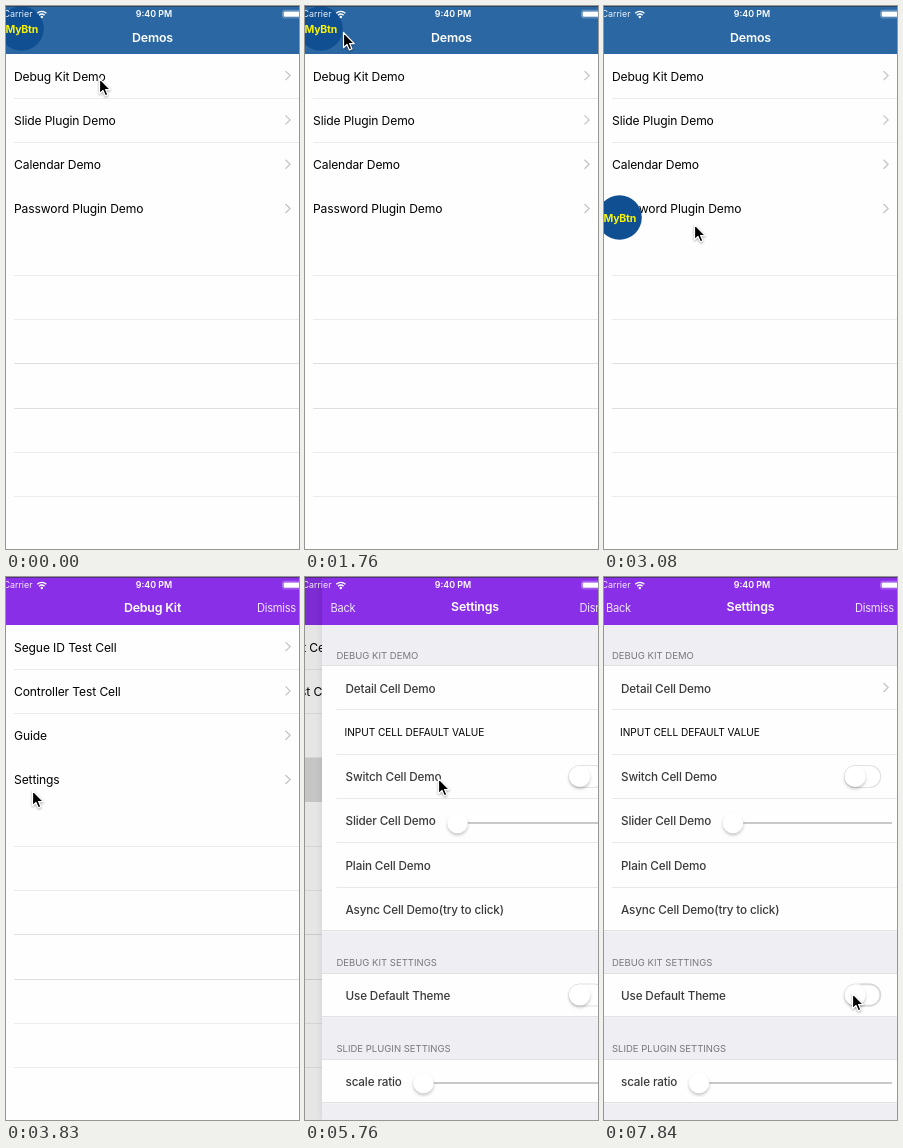
Write an HTML page that moves like this. It is 293 px wide and 543 px high and loops after 7990 ms.

```html
<!DOCTYPE html>
<html lang="en">
<head>
<meta charset="utf-8">
<title>Demos</title>
<style>
  html, body { margin: 0; width: 100%; height: 100%; overflow: hidden; background: #fefefe; }
  svg { display: block; width: 293px; height: 543px; font-family: Inter, "Liberation Sans", sans-serif; }
  .row { font-size: 12.1px; letter-spacing: -.12px; }
  .cell { font-size: 11.7px; font-weight: 500; letter-spacing: -.14px; fill: #3a3a3a; }
  .input { font-size: 10.1px; letter-spacing: -.03px; }
  .label { font-size: 9.5px; fill: #77777c; }
  .title { font-size: 12.4px; font-weight: 600; letter-spacing: -.2px; fill: #fff; text-anchor: middle; }
  .nav { font-size: 11.1px; letter-spacing: -.25px; fill: #f1e4ff; }
  .status { font-size: 8.9px; fill: #fff; }
  .chevron { fill: none; stroke: #c4c4c9; stroke-width: 1.3; }
  .lift { filter: drop-shadow(0 2px 1.6px rgba(0, 0, 0, .22)); }
  #settings { filter: drop-shadow(0 0 3px rgba(0, 0, 0, .1)); }
  #cursor { filter: drop-shadow(0 1px 1px rgba(0, 0, 0, .35)); }
</style>
</head>
<body>
<svg viewBox="0 0 293 543">
  <defs>
    <linearGradient id="beach" x1="0" y1="0" x2="0" y2="1">
      <stop offset="0" stop-color="#1673b4"/>
      <stop offset=".28" stop-color="#1b79b9"/>
      <stop offset=".37" stop-color="#3c89c4"/>
      <stop offset=".44" stop-color="#8db8da"/>
      <stop offset=".5" stop-color="#c6d6e2"/>
      <stop offset=".56" stop-color="#dddfe2"/>
      <stop offset=".65" stop-color="#e5e1df"/>
      <stop offset="1" stop-color="#e8e2df"/>
    </linearGradient>
    <filter id="soft" x="-50%" y="-50%" width="200%" height="200%"><feGaussianBlur stdDeviation="9"/></filter>
    <clipPath id="sheetClip"><path d="M0 -200H293V0H0Z"/></clipPath>
  </defs>

  <g id="demos"></g>
  <g id="debug"></g>
  <rect id="dim" width="293" height="543"/>
  <g id="settings"></g>

  <g id="button">
    <circle r="22.3" fill="#114f93"/>
    <text x=".3" y="4" text-anchor="middle" font-size="10.5" font-weight="700" letter-spacing="-.2" fill="#f6f20c">MyBtn</text>
  </g>

  <g class="status">
    <text x="-2.5" y="11.2" opacity=".9">Carrier</text>
    <text x="148" y="11.2" text-anchor="middle" font-weight="600">9:40 PM</text>
    <path d="M31.2 7.2a6.8 6.8 0 0 1 9.2 0M33 9.2a4.2 4.2 0 0 1 5.6 0" fill="none" stroke="#fff" stroke-width="1.3"/>
    <circle cx="35.8" cy="11" r="1.2"/>
    <rect x="276.5" y="4.3" width="22" height="7.6" rx="2" fill="none" stroke="#fff" stroke-width=".8" opacity=".4"/>
    <rect x="277.6" y="5.4" width="20" height="5.4" rx="1.2"/>
  </g>

  <g id="sheet" clip-path="url(#sheetClip)">
    <rect y="-170" width="293" height="170" fill="url(#beach)"/>
    <g filter="url(#soft)">
      <ellipse cx="68" cy="-80" rx="28" ry="10" fill="#b9c3ca" opacity=".7"/>
      <ellipse cx="120" cy="-122" rx="35" ry="14" fill="#4a93c9" opacity=".6"/>
      <ellipse cx="200" cy="-130" rx="45" ry="14" fill="#2f80d2" opacity=".8"/>
      <ellipse cx="75" cy="-27" rx="42" ry="9" fill="#e4d8dd"/>
      <path d="M205 8L300 -42V8Z" fill="#ffd3a9"/>
    </g>
    <circle cx="140" cy="-7.5" r="2.8" fill="#d0d2d7"/>
    <circle cx="153" cy="-7.5" r="2.8" fill="#fff"/>
  </g>

  <rect width="293" height="1" fill="#282828" opacity=".5"/>
  <path id="cursor" d="M0 0V15.2L3.5 12L5.9 17.4L8.4 16.3L6.1 11.1H10.8Z" fill="#000" stroke="#fff" stroke-width="1.2" stroke-linejoin="round"/>
</svg>

<script>
const LOOP = 7990, WIDTH = 306;
const el = id => document.getElementById(id);

const rect = (x, y, w, h, fill) => `<rect x="${x}" y="${y}" width="${w}" height="${h}" fill="${fill}"/>`;
const text = (kind, x, y, s) => `<text class="${kind}" x="${x}" y="${y}">${s}</text>`;
const chevron = y => `<path class="chevron" d="M279.5 ${y - 4.5}l4.6 4.5l-4.6 4.5"/>`;
const line = (y, color, x = 8) => rect(x, y, 299.5 - x, 1, color);
const header = (color, title, y) => rect(-6.5, 0, WIDTH, 48, color) + text('title', 146.5, y, title);
const dismiss = text('nav', 251, 35, 'Dismiss');

// Shared layout of the two list pages.
function listPage(bar, rows) {
  let s = rect(-6.5, 0, WIDTH, 543, '#fefefe');
  s += '<rect class="press" x="-6.5" y="180.5" width="306" height="44.5" fill="#d9d9d9" visibility="hidden"/>';
  for (const y of [92, 136, 269, 313, 357, 402, 446, 490])
    s += line(y, y === 357 || y === 402 ? '#dfdfe0' : '#ebebec');
  rows.forEach((name, i) => {
    const y = 70 + i * 44.3;
    s += text('row', 8, y + 4.5, name) + chevron(y - .4);
  });
  return s + bar;
}

const knob = (x, y, r) => `<circle class="lift" cx="${x}" cy="${y}" r="${r}" fill="#fff"/>`;
const toggle = (y, extra = '') =>
  `<rect x="240.5" y="${y - 11}" width="36.2" height="22" rx="11" fill="#fff" stroke="#e2e2e4" stroke-width="1.2"/>${extra}` + knob(251.1, y, 10.6);
const slider = (x, y) => rect(x, y - .7, 288 - x, 1.4, '#b4b4b6') + knob(x, y, 10.3);

function section(label, top, names) {
  const h = names.length * 44.3;
  let s = text('label', 8, top - 7, label) + rect(-6.5, top, WIDTH, h, '#fefefe');
  s += line(Math.floor(top), '#e2e2e5', -6.5) + line(Math.floor(top + h - .5), '#e2e2e5', -6.5);
  names.forEach((name, i) => {
    const y = top + i * 44.3;
    if (i) s += line(Math.round(y - .5), '#e8e8ea');
    s += /^INPUT/.test(name) ? text('input', 16, y + 26, name) : text('cell', 17, y + 27, name);
  });
  return s;
}

el('demos').innerHTML = listPage(header('#2b67a3', 'Demos', 36),
  ['Debug Kit Demo', 'Slide Plugin Demo', 'Calendar Demo', 'Password Plugin Demo']);
el('debug').innerHTML = listPage(header('#8a2fe8', 'Debug Kit', 34.5) + dismiss,
  ['Segue ID Test Cell', 'Controller Test Cell', 'Guide', 'Settings']);
el('settings').innerHTML = rect(-6.5, 0, WIDTH, 543, '#eeeef3') +
  section('DEBUG KIT DEMO', 88.5, ['Detail Cell Demo', 'INPUT CELL DEFAULT VALUE', 'Switch Cell Demo',
    'Slider Cell Demo', 'Plain Cell Demo', 'Async Cell Demo(try to click)']) +
  section('DEBUG KIT SETTINGS', 396, ['Use Default Theme']) +
  section('SLIDE PLUGIN SETTINGS', 482, ['scale ratio']) +
  chevron(110.5) + toggle(199.5) + slider(129, 246) + slider(95, 506) +
  toggle(418, '<path id="held" d="M256 407.4H265.7a10.6 10.6 0 0 1 0 21.2H256" fill="none" stroke="#dadadc" stroke-width="1.7"/>') +
  header('#8a2fe8', 'Settings', 34) + text('nav', 2, 35, 'Back') + dismiss;

// Tracks: [step, value...], linear between the points.
const cursorTrack = [
  [0, 93, 72], [2, 68, 30], [3, 58, 10], [4, 62, 4], [5, 72, 45], [6, 84, 108], [7, 89, 147], [8, 88, 128],
  [12, 38, 26], [16, 24, 25], [17, 24, 28], [18, 48, 82], [19, 88, 158], [20, 102, 217], [21, 90, 218],
  [23, 26, 213], [26, 26, 213], [28, 95, 290], [29, 125, 316], [30, 138, 280], [32, 132, 209], [34, 133, 201],
  [40, 133, 201], [42, 170, 330], [44, 218, 418], [46, 248, 416]];
const sheetTrack = [[4, 0], [5, 62], [6, 125], [7, 164], [8, 145], [9, 95], [10, 40], [11, 0]];
const buttonTrack = [[17, 15.5, 22.5], [18, 38, 75], [19, 74, 150], [20, 62, 206], [21, 15.5, 211.5]];
const pushTrack = [[37, WIDTH], [38, 130], [39, 23.5], [40, 3], [41, 0]];

function at(track, n) {
  const i = track.findIndex(k => k[0] >= n);
  if (i < 0) return track[track.length - 1].slice(1);
  if (i === 0) return track[0].slice(1);
  const a = track[i - 1], b = track[i], p = (n - a[0]) / (b[0] - a[0]);
  return a.slice(1).map((v, j) => v + (b[j + 1] - v) * p);
}

const move = (id, x, y) => el(id).setAttribute('transform', `translate(${x} ${y})`);
const show = (node, on) => node.setAttribute('visibility', on ? 'visible' : 'hidden');
const press = document.querySelector('#debug .press');

const stepAt = t => Math.floor((Math.sqrt(146.2 ** 2 + .128 * (t + 7)) - 146.2) / .064);

function draw(n) {
  const [push] = at(pushTrack, n), done = 1 - push / WIDTH;
  const [drop] = at(sheetTrack, n);
  const [x, y] = at(cursorTrack, n);
  move('cursor', x + .5, y + .5);
  move('button', ...at(buttonTrack, n));
  move('sheet', 0, drop);
  move('settings', push, 0);
  move('debug', -92 * done, 0);
  el('dim').setAttribute('opacity', .1 * done);
  show(el('sheet'), drop > 0);
  show(el('button'), n < 25);
  show(el('demos'), n < 25);
  el('debug').style.display = n < 25 ? 'none' : '';
  el('settings').style.display = n < 38 ? 'none' : '';
  show(press, n >= 37);
  show(el('held'), n >= 53);
}

const start = performance.now();
function tick() {
  draw(stepAt((performance.now() - start) % LOOP));
  requestAnimationFrame(tick);
}
tick();
</script>
</body>
</html>
```
